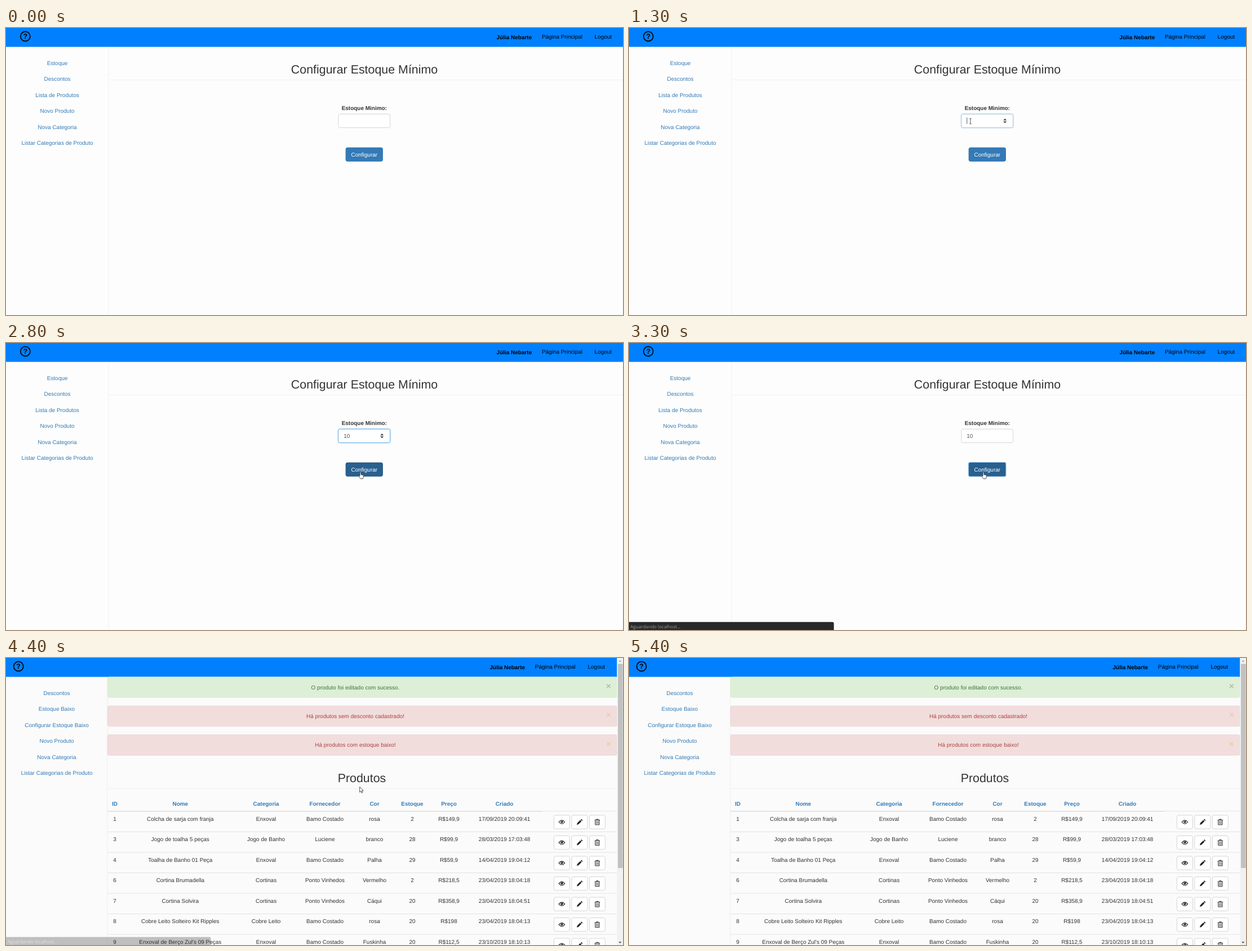
Animation, 1095 px wide and 511 px high, one loop 5700 ms. Source, as an HTML page:

```html
<!DOCTYPE html>
<html lang="pt-BR">
<head>
<meta charset="utf-8">
<title>Configurar Estoque Mínimo</title>
<style>
html, body { margin: 0; width: 100%; height: 100%; overflow: hidden; background: #fdfdfd; }
svg { display: block; width: 1095px; height: 511px; }
text { font: 9.98px "Liberation Sans", Arial, sans-serif; fill: #333; text-rendering: geometricPrecision; white-space: pre; }
.mid { text-anchor: middle; }
.bold { font-weight: bold; }
.title { font-size: 21.4px; }
.link { fill: #337ab7; }
.nav text { fill: #000; }
.rule { stroke: #eee; stroke-width: .8; }
.row { stroke: #ddd; stroke-width: .8; }
.field { fill: #fff; stroke: #ccc; stroke-width: .8; }
.typed text { fill: #555; }
.close { font-size: 15px; font-weight: bold; }
.status { font-family: "Open Sans", "Noto Sans", sans-serif; font-size: 8.13px; fill: #9c9c9c; }

/* Every part shares one 5.7 s timeline of hard steps. */
.step { animation: 5.7s step-end infinite; }
#page2 { animation-name: page2; }
#arrow { animation-name: arrow; }
#beam { animation-name: beam; }
#hand { animation-name: hand; }
#spin { animation-name: spin; }
#glow { animation-name: glow; filter: drop-shadow(0 0 1.6px rgba(102, 175, 233, .6)); }
#caret { animation-name: caret; }
#one { animation-name: one; }
#zero { animation-name: zero; }
#button { animation-name: button; }
#ring { animation-name: ring; }
#bar { animation-name: bar; }

@keyframes page2 { 0% { visibility: hidden } 70.17%, to { visibility: visible } }
@keyframes arrow {
  0% { translate: -30px -30px }
  3.5% { translate: 234px 70px }
  5.26% { translate: 372px 140px }
  7.01% { translate: 427px 173px }
  10.52% { translate: 444px 175px }
  12.28% { translate: 477px 177.3px }
  14.03% { translate: 530px 174px }
  15.78% { translate: 574px 169px }
  17.54% { translate: -30px -30px }
  45.61% { translate: 618px 190px }
  47.36% { translate: 624px 208px }
  49.12% { translate: -30px -30px }
  75.43% { translate: 627.3px 229px }
  78.94% { translate: 624px 204px }
  80.7% { translate: 618px 180.5px }
  84.21% { translate: 590px 165px }
  85.96% { translate: 500px 130px }
  87.71% { translate: 380px 90px }
  89.47% { translate: 250px 50px }
  91.22% { translate: 150px 15px }
  92.98% { translate: 74px -10.8px }
  94.73%, to { translate: -30px -30px }
}
@keyframes beam {
  0% { translate: -30px -30px }
  17.54% { translate: 598px 166px }
  19.29% { translate: 606px 166px }
  31.57% { translate: -30px -30px }
  43.85% { translate: 611px 170px }
  45.61%, to { translate: -30px -30px }
}
@keyframes hand {
  0% { translate: -30px -30px }
  49.12% { translate: 625.4px 229px }
  75.43%, to { translate: -30px -30px }
}
@keyframes spin { 0% { opacity: 0 } 17.54% { opacity: 1 } 52.63%, to { opacity: 0 } }
@keyframes glow {
  0% { opacity: 0 }
  22.8% { opacity: .55 }
  24.56% { opacity: 1 }
  52.63% { opacity: .45 }
  54.38%, to { opacity: 0 }
}
@keyframes caret {
  0% { opacity: 0; translate: 0 }
  22.8% { opacity: 1; translate: 0 }
  31.57% { opacity: 0; translate: 0 }
  33.33% { opacity: 1; translate: 5.2px }
  35.08% { opacity: 1; translate: 10.2px }
  43.85%, to { opacity: 0; translate: 10.2px }
}
@keyframes one { 0% { opacity: 0 } 33.33%, to { opacity: 1 } }
@keyframes zero { 0% { opacity: 0 } 35.08%, to { opacity: 1 } }
@keyframes button {
  0% { fill: #337ab7; stroke: #2e6da4 }
  49.12%, to { fill: #286090; stroke: #204d74 }
}
@keyframes ring { 0% { opacity: 0 } 52.63%, to { opacity: 1 } }
@keyframes bar {
  0% { opacity: 0 }
  57.89% { opacity: 1 }
  75.43% { opacity: .6 }
  77.19% { opacity: .28 }
  78.94%, to { opacity: 0 }
}
</style>
</head>
<body>
<svg viewBox="0 0 1095 511">
  <defs>
    <g id="eye">
      <path d="M-5.3 0Q0-6.4 5.3 0Q0 6.4-5.3 0z" fill="none" stroke="#222" stroke-width="1.1"/>
      <circle cy="-.4" r="2.2" fill="#222"/>
      <circle cx="-.7" cy="-1" r=".7" fill="#fff"/>
    </g>
    <path id="pencil" d="M-5 5l1-3.2 5.3-5.3 2.2 2.2-5.3 5.3zM2-4.2l.8-.8q.5-.4 1 0l1.2 1.2q.4.5 0 1l-.8.8z" fill="#222"/>
    <path id="trash" d="M-4.7-3.4H4.7M-1.6-3.6V-4.9H1.6V-3.6M-3.6-3V4.9H3.6V-3M-1.3-1.8V3.6M1.3-1.8V3.6" fill="none" stroke="#222"/>
  </defs>

  <g id="page1">
    <rect width="1095" height="511" fill="#fdfdfd"/>
    <path class="rule" d="M182 33V511M182 92.4H1095M1094.6 33V511"/>
    <g class="nav" id="nav1"></g>
    <g id="menu1"></g>
    <text class="mid title" x="636" y="81">Configurar Estoque Mínimo</text>
    <text class="mid bold" x="635.8" y="145.7">Estoque Minimo:</text>
    <rect class="field" x="589.8" y="153.3" width="91.9" height="24.2" rx="2.8"/>
    <rect class="step" id="glow" x="589.8" y="153.3" width="91.9" height="24.2" rx="2.8" fill="#fff" stroke="#66afe9" stroke-width=".9"/>
    <g class="typed">
      <text class="step" id="one" x="599.2" y="168.7">1</text>
      <text class="step" id="zero" x="604.75" y="168.7">0</text>
    </g>
    <path class="step" id="caret" d="M599.8 159.5V170.8" stroke="#333" stroke-width=".8"/>
    <path class="step" id="spin" d="M664.2 164.4L667.2 161.2L670.2 164.4zM664.2 166.2L667.2 169.4L670.2 166.2z" fill="#444"/>
    <rect class="step" id="button" x="603.1" y="213.1" width="65.4" height="24.2" rx="2.8" stroke-width=".8"/>
    <rect class="step" id="ring" x="602.7" y="212.6" width="66.2" height="25.2" rx="1.5" fill="none" stroke="#83b8e4" stroke-width="1"/>
    <text class="mid" x="635.8" y="228.5" style="fill:#fff">Configurar</text>
  </g>

  <g class="step" id="page2">
    <rect width="1095" height="511" fill="#fbfbfb"/>
    <path class="rule" d="M179.8 33V511M180 232.5H1084.4"/>
    <g class="nav" id="nav2" transform="translate(-12.1)"></g>
    <g id="menu2"></g>
    <g id="alerts"></g>
    <text class="mid title" x="631.5" y="220.8">Produtos</text>
    <g id="table"></g>
    <rect x="1084.4" width="10.6" height="511" fill="#f1f1f1"/>
    <rect x="1086" y="10.5" width="8.6" height="363.5" fill="#c1c1c1"/>
    <path d="M1087.2 6.6L1089.8 3.8L1092.4 6.6z" fill="#a3a3a3"/>
    <path d="M1087.2 505.2L1089.8 508L1092.4 505.2z" fill="#505050"/>
  </g>

  <g class="step" id="bar">
    <path d="M0 496.8H361Q363.6 496.8 363.6 499.4V511H0z" fill="#292929"/>
    <text class="status" x="2.4" y="507.7">Aguardando localhost...</text>
  </g>

  <g stroke-linejoin="round" fill="#fff" stroke="#222" stroke-width=".8">
    <path class="step" id="arrow" d="M.4.4V10L2.5 8 4 11.3 5.5 10.6 4.1 7.4H7z"/>
    <path class="step" id="beam" d="M-1.8-4.8Q0-4.8 0-4Q0-4.8 1.8-4.8M0-4V4M-1.8 4.8Q0 4.8 0 4Q0 4.8 1.8 4.8" fill="none"/>
    <path class="step" id="hand" d="M2.6 1.6a1 1 0 0 1 2 0V5.3L8 6.1q1.2.3 1.1 1.6L8.7 10.4 7.9 12.7H3.7L.6 8.6Q0 7.4 1.2 7.1L2.6 8.3z"/>
  </g>
</svg>

<script>
const fill = (id, markup) => document.getElementById(id).innerHTML = markup;
const label = (x, y, str, cls = "mid", extra = "") =>
  `<text class="${cls}" x="${x}" y="${y}" ${extra}>${str}</text>`;

const nav = `<rect x="-20" width="${1116.5}" height="33.6" fill="#0080ff"/>
  <circle cx="34.3" cy="14.9" r="8.5" fill="none" stroke="#000" stroke-width="1.7"/>` +
  label(34.3, 19.4, "?", "mid bold", 'style="font-size:12.5px"') +
  label(870.6, 20, "Júlia Nebarte", "bold") +
  label(950.9, 19, "Página Principal", "") +
  label(1044.6, 19, "Logout", "");
fill("nav1", nav);
fill("nav2", nav);

const menu = (x, items) =>
  items.map((item, i) => label(x, 65.7 + i * 28.52, item, "mid link")).join("");
const shared = ["Novo Produto", "Nova Categoria", "Listar Categorias de Produto"];
fill("menu1", menu(91, ["Estoque", "Descontos", "Lista de Produtos", ...shared]));
fill("menu2", menu(90, ["Descontos", "Estoque Baixo", "Configurar Estoque Baixo", ...shared]));

// text, background, border, ink, close mark
const alerts = [
  ["O produto foi editado com sucesso.", "#ddefd7", "#d6e9c6", "#3c763d", "#b0bfac"],
  ["Há produtos sem desconto cadastrado!", "#f2dddd", "#ebccd1", "#a94442", "#e8cfa8"],
  ["Há produtos com estoque baixo!", "#f2dddd", "#ebccd1", "#a94442", "#e8cfa8"]
];
fill("alerts", alerts.map(([str, back, edge, ink, mark], i) => {
  const y = 33.8 + i * 51.4;
  return `<rect x="180.2" y="${y}" width="904" height="36.6" rx="2.8" fill="${back}" stroke="${edge}" stroke-width=".6"/>` +
    label(620, y + 21.7, str, "mid", `style="fill:${ink}"`) +
    label(1069.4, y + 21, "×", "mid close", `style="fill:${mark}"`);
}).join(""));

const columns = [193, 309.3, 461.6, 566, 654, 721, 786, 884.6];
const heads = ["ID", "Nome", "Categoria", "Fornecedor", "Cor", "Estoque", "Preço", "Criado"];
const rows = `1|Colcha de sarja com franja|Enxoval|Bamo Costado|rosa|2|R$149,9|17/09/2019 20:09:41
3|Jogo de toalha 5 peças|Jogo de Banho|Luciene|branco|28|R$99,9|28/03/2019 17:03:48
4|Toalha de Banho 01 Peça|Enxoval|Bamo Costado|Palha|29|R$59,9|14/04/2019 19:04:12
6|Cortina Brumadella|Cortinas|Ponto Vinhedos|Vermelho|2|R$218,5|23/04/2019 18:04:18
7|Cortina Solvira|Cortinas|Ponto Vinhedos|Cáqui|20|R$358,9|23/04/2019 18:04:51
8|Cobre Leito Solteiro Kit Ripples|Cobre Leito|Bamo Costado|rosa|20|R$198|23/04/2019 18:04:13
9|Enxoval de Berço Zul's 09 Peças|Enxoval|Bamo Costado|Fuskinha|20|R$112,5|23/10/2019 18:10:13`
  .split("\n").map(line => line.split("|"));

const tool = (name, x, y) => `<g transform="translate(${x} ${y})">
  <rect class="field" x="-14" y="-12.1" width="28" height="24.2" rx="2.8"/><use href="#${name}"/></g>`;

fill("table",
  heads.map((head, i) => label(columns[i], 262.6, head, "mid bold link")).join("") +
  `<path class="row" d="M180 272.7H1084.4"/><path class="row" d="M180 272.8H951" style="stroke-width:1.4"/>` +
  rows.map((cells, i) => {
    const y = i * 36.53;
    return cells.map((cell, j) => label(columns[j], 289.6 + y, cell)).join("") +
      ["eye", "pencil", "trash"].map((name, j) => tool(name, 986.4 + j * 31.5, 292 + y)).join("") +
      `<path class="row" d="M180 ${309.5 + y}H1084.4"/>`;
  }).join(""));
</script>
</body>
</html>
```
